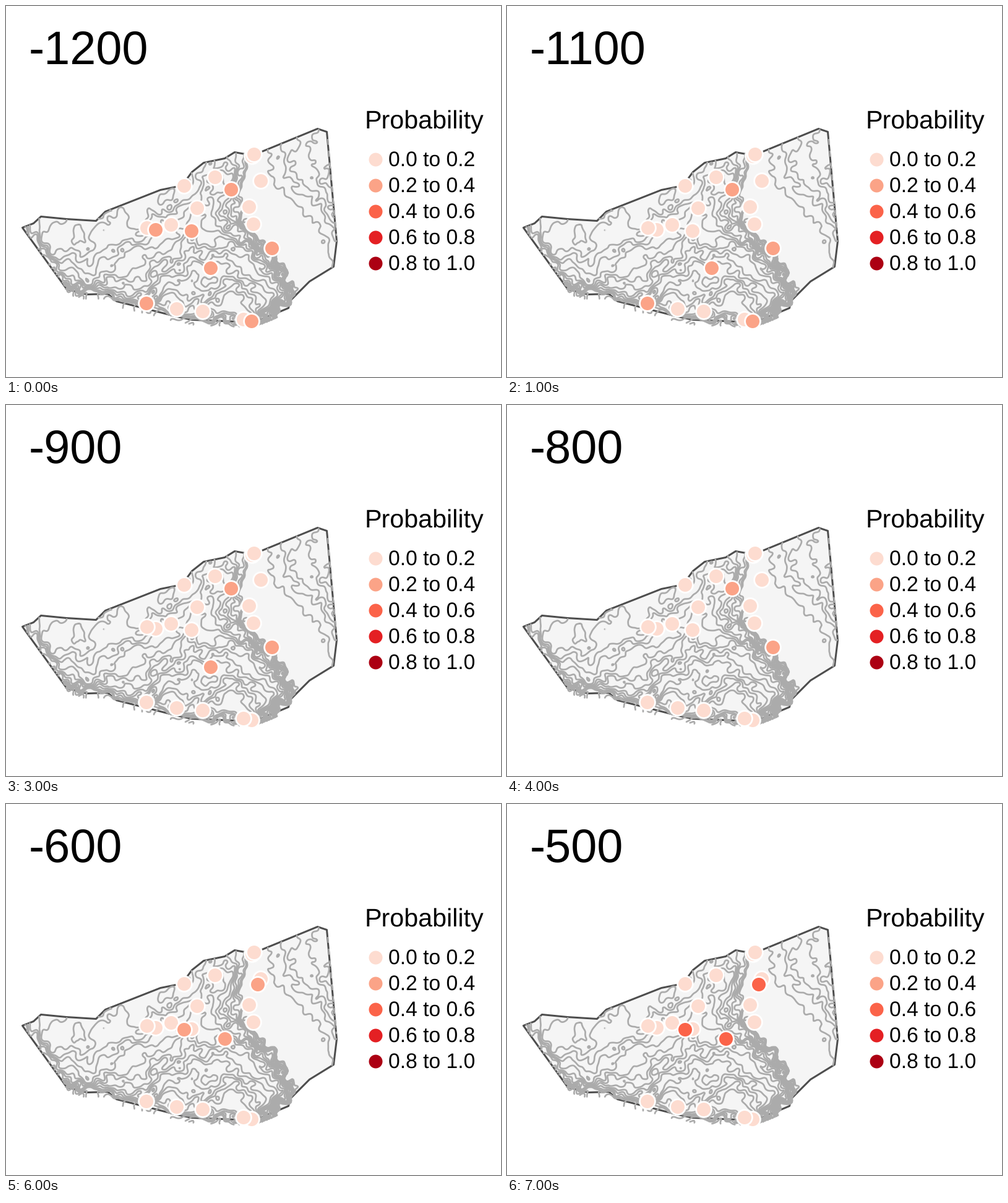
Write a matplotlib script that moves like this. It is 800 px wide and 600 px high and loops after 8 s.

```python
import numpy as np
import matplotlib.pyplot as plt
from matplotlib.animation import FuncAnimation
from matplotlib.path import Path

W, H, DPI = 800, 600, 100
PX = 72 / DPI  # points per pixel
REDS = ["#fddcd0", "#fba387", "#fb6349", "#e42023", "#ac0013"]
GREY = "#ababab"

plt.rcParams["font.family"] = "Liberation Sans"
plt.rcParams["text.hinting"] = "none"

fig = plt.figure(figsize=(W / DPI, H / DPI), dpi=DPI, facecolor="white")
ax = fig.add_axes([0, 0, 1, 1])
ax.set_xlim(0, W)
ax.set_ylim(H, 0)
ax.axis("off")

# Study area
NORTH = [
    (26, 358), (44, 351), (56, 340), (97, 344), (145, 347), (160, 332),
    (249, 297), (284, 290), (300, 268), (319, 253), (353, 246), (369, 236),
    (386, 239), (413, 235), (503, 198), (518, 203), (534, 380), (529, 421),
    (490, 445),
]
SOUTH = [
    (459, 476), (456, 488), (413, 506), (397, 511), (300, 507), (276, 502),
    (178, 477), (164, 465), (131, 466), (98, 458),
]
border = np.array(NORTH + SOUTH) + 0.5
ax.fill(*border.T, facecolor="#f5f5f5", edgecolor="#4d4d4d",
        linewidth=3 * PX, joinstyle="round", zorder=1)

rng = np.random.default_rng(11)


def noise(x, y, short, long, count=30):
    """Smooth random field of unit variance with the given wavelengths."""
    total = 0
    for _ in range(count):
        k = 2 * np.pi / rng.uniform(short, long)
        a, phase = rng.uniform(0, 2 * np.pi, 2)
        total = total + np.sin(k * (x * np.cos(a) + y * np.sin(a)) + phase)
    return total / np.sqrt(count / 2)


def south_edge(x):
    sx, sy = np.array(SOUTH[::-1]).T
    return np.interp(x, sx, sy)


def elevation(x, y):
    # Bending the coordinates makes the contours meander
    x, y = (x + 3.6 * noise(x, y, 15, 34), y + 3.6 * noise(x, y, 15, 34))
    rough = noise(x, y, 45, 110)

    # Western hills: rise southwards, drop steeply to the river
    river = np.interp(y, [240, 300, 350, 380, 405, 435, 465, 505],
                      [394, 382, 386, 410, 440, 456, 470, 430])
    bank = 1 - np.exp(-np.maximum(river - x, 0) / 20)
    foot = np.maximum(465 - 0.55 * x, 300)
    slope = np.logaddexp(0, (y - foot) / 12) * 12 / 15
    west_dist = ((x - 30) * 93 - (y - 362) * 68) / 115
    rim = 4 * np.exp(-np.maximum(west_dist, 0) / 16)
    rim += 4 * np.exp(-np.maximum(south_edge(x) - y, 0) / 9)
    knot = 4 * np.exp(-((x - 352) ** 2 + (y - 285) ** 2) / 30 ** 2)
    west = bank * (5 + slope + rim + knot + 0.6 * rough)

    # Eastern hills beyond the flat valley floor
    start = np.interp(y, [240, 285, 335, 355, 405], [426, 430, 484, 505, 524])
    up = x - start
    east = 0.5 + up / 24 + 0.4 * rough * np.clip(up / 20, 0, 1)
    return west + np.maximum(east, 0)


gx, gy = np.meshgrid(np.arange(20, 540, 1.5), np.arange(190, 525, 1.5))
inside = Path(border).contains_points(np.c_[gx.ravel(), gy.ravel()])
spill = (gx > 95) & (gx < 478) & (gy > 440) & (gy < south_edge(gx) + 9)
shown = inside.reshape(gx.shape) | spill
height = np.ma.masked_where(~shown, elevation(gx, gy))
contours = ax.contour(gx, gy, height, levels=np.arange(0.5, 32), colors=GREY,
                      linewidths=2.7 * PX, zorder=2)
contours.set_capstyle("round")
ax.plot([520, 534], [215, 372], color=GREY, linewidth=2.4 * PX,
        linestyle=(0, (4, 4)), zorder=2)

# Legend
ax.text(579.4, 198, "Probability", fontsize=41.2 * PX)
for i, color in enumerate(REDS):
    y = 248 + 42 * i
    ax.scatter(596.5, y - 0.3, s=(22 * PX) ** 2, color=color, linewidths=0)
    ax.text(618.5, y + 11.7, f"{i * 0.2:.1f} to {(i + 1) * 0.2:.1f}",
            fontsize=33.6 * PX)

year = ax.text(36.5, 93, "", fontsize=75.6 * PX)

# Sites always present, and how many steps some of them stay in class 1
STEADY = [
    (398, 243), (401, 240), (338, 277), (288, 291), (412, 283), (309, 327),
    (393, 325), (400, 353), (267, 354), (242, 362), (228, 359), (300, 364),
    (227, 481), (276, 490), (318, 494), (397, 510), (384, 507),
]
WARM = {(242, 362): 1, (300, 364): 1, (227, 481): 2, (397, 510): 2}
# Sites that vanish after some steps, and sites that appear late and rise
FADING = {(364, 297): 6, (430, 392): 6, (331, 424): 4}
RISING, RISE_START = [(407, 292), (288, 365), (354, 380)], 6

dots = ax.scatter([], [], s=(24.8 * PX) ** 2, edgecolors="white",
                  linewidths=2.8 * PX, zorder=5)


def sites_at(step):
    sites = [(p, int(step < WARM.get(p, 0))) for p in STEADY]
    sites += [(p, 1) for p, end in FADING.items() if step < end]
    if step >= RISE_START:
        sites += [(p, step - RISE_START + 1) for p in RISING]
    return sorted(sites, key=lambda s: s[1])  # likelier sites lie on top


def update(step):
    year.set_text(str(-1200 + 100 * step))
    points, classes = zip(*sites_at(step))
    dots.set_offsets(points)
    dots.set_facecolors([REDS[c] for c in classes])
    return year, dots


anim = FuncAnimation(fig, update, frames=8, interval=1000, repeat=True)
plt.show()
```
